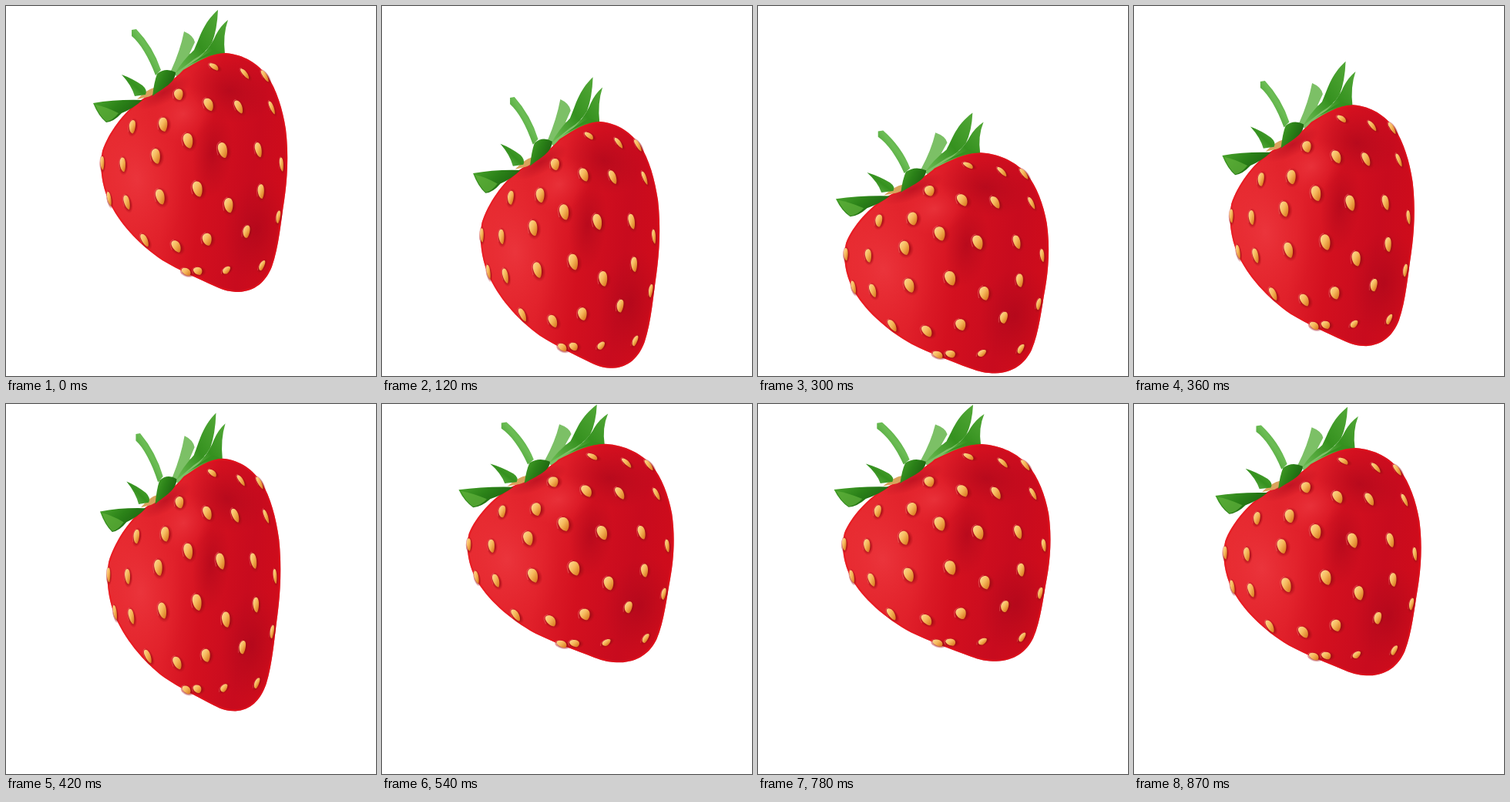
An HTML page that plays this animation: 480 px wide and 480 px high, repeating every 0.9 s.

```html
<!DOCTYPE html>
<html lang="en">
<head>
<meta charset="utf-8">
<title>Bouncing strawberry</title>
<style>
  html, body { margin: 0; width: 100%; height: 100%; overflow: hidden; background: #fff; }
  svg { display: block; width: 100vw; height: 100vh; }
</style>
</head>
<body>
<svg viewBox="0 0 480 480" xmlns="http://www.w3.org/2000/svg">
  <defs>
    <linearGradient id="skin" gradientUnits="userSpaceOnUse" x1="130" y1="200" x2="365" y2="235">
      <stop offset="0" stop-color="#e62a30"/>
      <stop offset=".35" stop-color="#e0202a"/>
      <stop offset=".55" stop-color="#d3101f"/>
      <stop offset=".8" stop-color="#c80b1e"/>
      <stop offset="1" stop-color="#cf0c1b"/>
    </linearGradient>
    <radialGradient id="light">
      <stop offset="0" stop-color="#f2444a" stop-opacity=".5"/>
      <stop offset="1" stop-color="#ee3035" stop-opacity="0"/>
    </radialGradient>
    <radialGradient id="dark">
      <stop offset="0" stop-color="#a0051a" stop-opacity=".5"/>
      <stop offset="1" stop-color="#a80a1b" stop-opacity="0"/>
    </radialGradient>
    <radialGradient id="pit">
      <stop offset=".5" stop-color="#9a0a12" stop-opacity=".85"/>
      <stop offset="1" stop-color="#b00d16" stop-opacity="0"/>
    </radialGradient>
    <linearGradient id="grain" x1="0" y1="0" x2=".7" y2="1">
      <stop offset="0" stop-color="#ffe0a0"/>
      <stop offset=".5" stop-color="#f6b95c"/>
      <stop offset="1" stop-color="#d8741c"/>
    </linearGradient>
    <linearGradient id="leaf" x1="0" y1="1" x2="1" y2="0">
      <stop offset="0" stop-color="#6fbd55"/>
      <stop offset=".5" stop-color="#35911f"/>
      <stop offset="1" stop-color="#52a837"/>
    </linearGradient>
    <linearGradient id="deep" x1="0" y1="0" x2="1" y2=".5">
      <stop offset="0" stop-color="#4aa52c"/>
      <stop offset=".5" stop-color="#2b8218"/>
      <stop offset="1" stop-color="#1b6010"/>
    </linearGradient>
    <linearGradient id="stalk" x1="0" y1=".6" x2=".6" y2="0">
      <stop offset="0" stop-color="#3f982a"/>
      <stop offset=".6" stop-color="#6cbd55"/>
      <stop offset="1" stop-color="#4ba236"/>
    </linearGradient>
    <path id="outline" d="M172 124C153 138 133 164 125 188C121 207 124 232 133 252C146 281 172 309 203 330C225 343 250 354 272 364C283 369 291 371 302 371C323 370 337 358 345 338C354 313 357 277 361 252C365 226 367 193 363 160C359 134 351 108 339 91C327 75 309 63 285 61C266 61 249 72 230 83C218 97 194 110 172 124Z"/>
    <clipPath id="body"><use href="#outline"/></clipPath>
    <g id="seed">
      <ellipse cx="1" cy="1" rx="11" ry="14.5" fill="url(#pit)"/>
      <path d="M-8 5C-9 -5 -6 -11 0 -12" fill="none" stroke="#f4706a" stroke-opacity=".5" stroke-width="1.3"/>
      <path d="M0 -10.5C4 -10.5 6.4 -6.5 6.2 -2C6 4 3.5 9.5 1 10.5C-3 9.5 -6 4 -6.2 -2C-6.4 -6.5 -4 -10.5 0 -10.5Z" fill="url(#grain)"/>
    </g>
  </defs>
  <g id="berry">
    <path d="M231 33Q243 38 245 47L238 62L256 58L285 64L222 92L214 84Q226 58 231 33Z" fill="#7cc066"/>
    <path d="M288 18Q281 38 284 62Q266 61 236 80Q264 58 272 38Q278 26 288 18Z" fill="url(#leaf)"/>
    <use href="#outline" fill="url(#skin)"/>
    <g clip-path="url(#body)">
      <g id="shade"></g>
      <use href="#outline" fill="none" stroke="#e9141c" stroke-opacity=".6" stroke-width="4"/>
    </g>
    <g id="seeds"></g>
    <path d="M170 121Q183 108 192 106Q196 114 184 118Z" fill="#d9a35c"/>
    <path d="M275 5Q274 31 267 48Q258 62 244 69L219 88Q228 72 244 57C252 40 255 23 275 5Z" fill="url(#leaf)"/>
    <path d="M283 61Q262 61 234 79Q252 66 270 57Z" fill="#35901f"/>
    <path d="M150 89Q164 94 177 103Q184 109 181 115L167 117Q163 103 150 89Z" fill="url(#leaf)"/>
    <path d="M163 31L169 30Q191 53 201 83L194 90C185 66 174 48 163 39Z" fill="url(#stalk)"/>
    <path d="M113 126Q143 121 177 122Q165 133 150 139Q140 150 130 151Q120 143 113 126Z" fill="url(#deep)"/>
    <path d="M116 128Q128 130 146 139Q138 149 130 150Q121 142 116 128Z" fill="#62b23c" fill-opacity=".7"/>
    <path d="M196 88Q207 79 220 86C220 100 204 106 190 117Q192 99 196 88Z" fill="url(#deep)"/>
  </g>
</svg>
<script>
const $ = id => document.getElementById(id);
const CX = 239.5, CY = 188, STEP = 30, LOOP = 900;

const blob = (fill, x, y, rx, ry, turn) =>
  `<ellipse rx="${rx}" ry="${ry}" fill="url(#${fill})" transform="translate(${x} ${y}) rotate(${turn})"/>`;
$('shade').innerHTML =
  blob('light', 170, 225, 60, 95, -8) + blob('light', 230, 140, 42, 34, -25) +
  blob('dark', 290, 110, 55, 40, 20) + blob('dark', 268, 190, 26, 60, 5) +
  blob('dark', 325, 290, 42, 70, 8) + blob('dark', 205, 112, 40, 14, -28);

// Seeds sit on bowed strands: start, end, count, bow
const strands = [
  [164, 157, 180, 304, 4, -20, 0],
  [204, 154, 221, 312, 4, -17, -13],
  [224, 115, 261, 303, 4, 0, -3],
  [263, 128, 286, 343, 4, 12, -14],
  [302, 131, 312, 293, 4, 25, 2],
  [345, 132, 332, 337, 4, 19, 6],
  [270, 79, 336, 91, 3, 7, 3],
  [125, 204, 134, 250, 2, 0, 0],
  [234, 345, 249, 344, 2, 0, 0]
];

// Foreshortens a seed towards the rim, as on an ellipsoid
function seed(x, y) {
  const dx = (x - 245) / 122, dy = (y - 215) / 155;
  const k = Math.sqrt(Math.max(.2, 1 - dx * dx - dy * dy));
  const out = Math.atan2(dy / 155, dx / 122) * 180 / Math.PI;
  const size = .78 + .22 * k;
  return `<use href="#seed" transform="translate(${x} ${y}) rotate(${out}) ` +
    `scale(${k * size} ${size}) rotate(${-out - 12})"/>`;
}

$('seeds').innerHTML = strands.map(([x1, y1, x2, y2, n, bx, by]) =>
  Array.from({ length: n }, (_, i) => {
    const u = i / (n - 1), bow = 4 * u * (1 - u);
    return seed(x1 + (x2 - x1) * u + bx * bow, y1 + (y2 - y1) * u + by * bow);
  }).join('')).join('');

// Key poses of the bounce: time, centre height, width factor
const poses = [
  [0, 188, 1], [120, 281, .96], [210, 334, 1.257], [300, 307.5, 1.095],
  [420, 205, .929], [540, 168, 1.107], [660, 166.5, 1.1186], [750, 166.5, 1.1186], [870, 178, 1.059]
];
const pose = i => {
  const n = poses.length, [t, y, w] = poses[(i + n) % n];
  return [t + Math.floor(i / n) * LOOP, y, w];
};
const slope = (i, c) => (pose(i + 1)[c] - pose(i)[c]) / (pose(i + 1)[0] - pose(i)[0]);
function tangent(i, c) {
  const a = slope(i - 1, c), b = slope(i, c);
  return a * b > 0 ? 2 * a * b / (a + b) : 0;
}

// Monotone cubic between neighbouring poses
function value(t, c) {
  const i = poses.findLastIndex(p => p[0] <= t);
  const a = pose(i), b = pose(i + 1), d = b[0] - a[0], u = (t - a[0]) / d, v = 1 - u;
  return a[c] * (1 + 2 * u) * v * v + b[c] * (3 - 2 * u) * u * u +
    d * u * v * (tangent(i, c) * v - tangent(i + 1, c) * u);
}

function draw(ms) {
  const t = Math.floor((ms % LOOP) / STEP) * STEP;
  const sx = value(t, 2), sy = 1 - .8 * (sx - 1);
  $('berry').setAttribute('transform',
    `translate(${CX} ${value(t, 1)}) scale(${sx} ${sy}) translate(${-CX} ${-CY})`);
}

let start;
function tick(now) {
  start ??= now;
  draw(now - start);
  requestAnimationFrame(tick);
}
draw(0);
requestAnimationFrame(tick);
</script>
</body>
</html>
```
